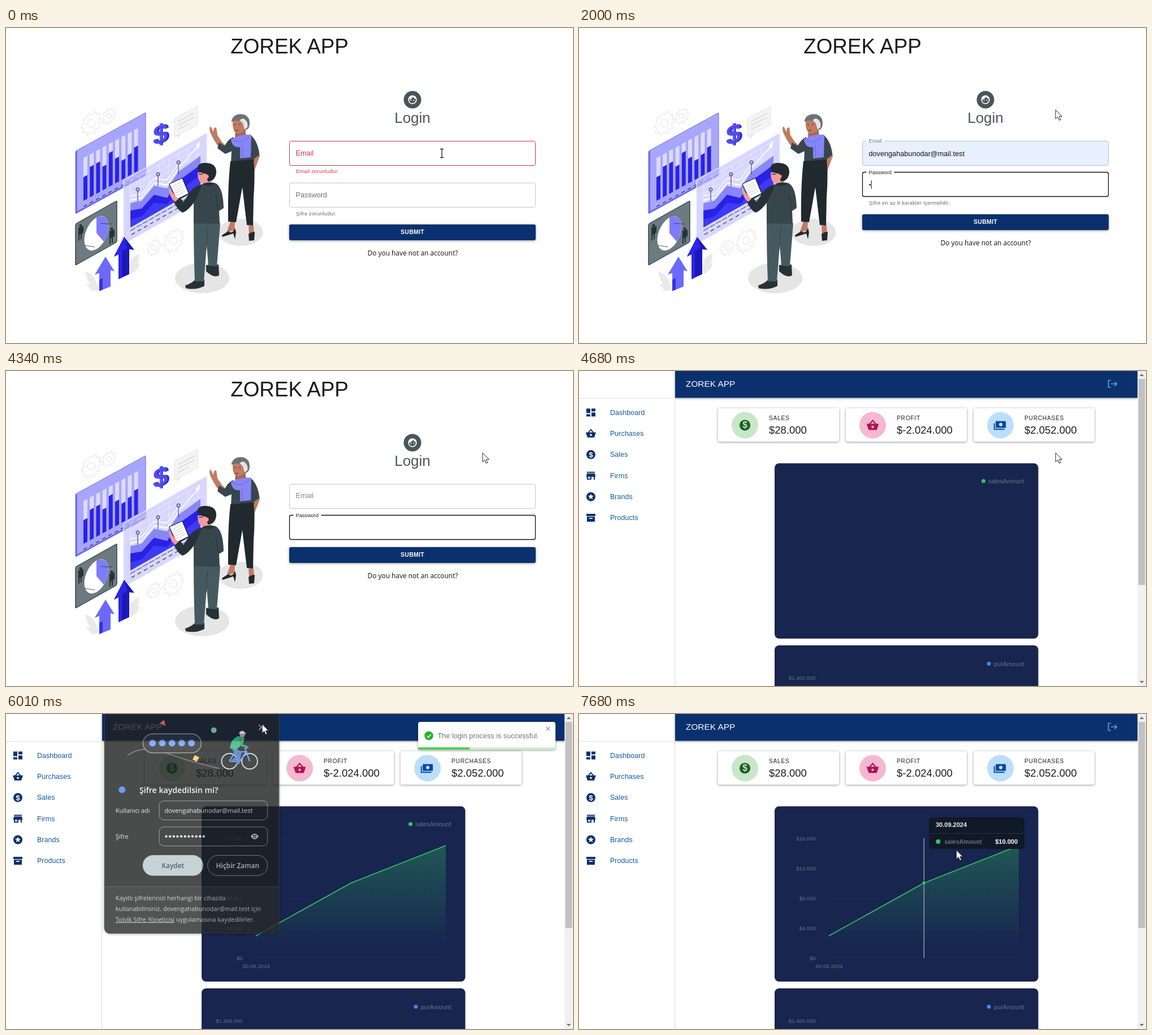
An HTML page that plays this animation: 1003x558 px, repeating every 8000 ms.

```html
<!DOCTYPE html>
<html lang="en">
<head>
<meta charset="utf-8">
<title>Login and dashboard</title>
<style>
html, body { margin: 0; width: 100%; height: 100%; overflow: hidden; background: #fff; }
svg { display: block; width: 100vw; height: 100vh; font-family: "Liberation Sans", Arial, sans-serif; }
.ui { font-family: "Open Sans", "Noto Sans", sans-serif; }
.b { font-weight: bold; }
.s { font-weight: 600; }
.sh { filter: drop-shadow(0 1px 2px #0006); }
</style>
</head>
<body>
<svg id="stage" viewBox="0 0 1003 558"></svg>
<script>
const LOOP = 8000;
const STEPS = [0, 330, 670, 1000, 1340, 1670, 2000, 2340, 2670, 3010, 3340, 4010, 4340, 4680,
  5010, 5340, 5680, 6010, 6350, 6680, 7010, 7350, 7680];
const APP = 'ZOREK APP', MAIL = 'dovengahabunodar@mail.test';
const NAVY = '#0a316e', GREEN = '#34c463', GREY = '#6b7280';

const text = (x, y, str, size, fill, attrs = '') =>
  `<text x="${x}" y="${y}" font-size="${size}" fill="${fill}" ${attrs}>${str}</text>`;
const rect = (x, y, w, h, fill, attrs = '') =>
  `<rect x="${x}" y="${y}" width="${w}" height="${h}" fill="${fill}" ${attrs}/>`;
const ellipse = (x, y, rx, ry, fill, attrs = '') =>
  `<ellipse cx="${x}" cy="${y}" rx="${rx}" ry="${ry}" fill="${fill}" ${attrs}/>`;
const circle = (x, y, r, fill, attrs) => ellipse(x, y, r, r, fill, attrs);
const path = (d, fill, attrs = '') => `<path d="${d}" fill="${fill}" ${attrs}/>`;
const line = (d, stroke, width = 1, attrs = '') =>
  path(d, 'none', `stroke="${stroke}" stroke-width="${width}" ${attrs}`);
const group = (attrs, ...parts) => `<g ${attrs}>${parts.join('')}</g>`;
const times = (n, f) => Array.from({ length: n }, (_, i) => f(i)).join('');
const END = 'text-anchor="end"', MID = 'text-anchor="middle"';

// ---------- illustration ----------
function gear(x, y, r) {
  const pts = times(40, i => {
    const a = i / 40 * 2 * Math.PI, q = i % 4 < 2 ? r : r * .78;
    return `${(x + q * Math.cos(a)).toFixed(1)},${(y + q * Math.sin(a) * 1.1 - q * Math.cos(a) * .4).toFixed(1)} `;
  });
  return `<polygon points="${pts}" fill="#fff" stroke="#dedede"/>` + circle(x, y, r * .38, '#fff', 'stroke="#dedede"');
}

function barPanel() {
  const dark = [42, 54, 54, 42, 60, 44, 34, 38, 45];
  return group('transform="matrix(1 -.55 0 1 123 218)"',
    rect(0, 0, 124, 111, '#a8a6fc', 'rx="2" stroke="#6f6bf3"'),
    line('M1.5 1V109.5H123', '#6763f2', 2.5),
    dark.map((h, i) => rect(14 + 11.2 * i, 20, 7, 76, '#dcdbfe') + rect(14 + 11.2 * i, 96 - h, 7, h, '#2a22e8')).join(''),
    line('M14 106H114', '#30355f', 1.5, 'stroke-dasharray="6 5"'));
}

function piePanel() {
  return group('transform="matrix(1 -.56 0 1 123 347)"',
    rect(0, 0, 73, 73, '#6b7b80', 'rx="2" stroke="#37474f" stroke-width="1.5"'),
    ellipse(37, 37.5, 21.5, 28, '#fff'),
    path('M37 37V9.5A21.5 28 0 0 1 50 59.5Z', '#7f7cfa'),
    line('M44 24L64 36M34 60L16 47', '#263238', .7)) +
    [[132, 360], [187, 366]].map(([x, y]) => circle(x, y - 10, 2.5, '#263238') +
      path(`M${x - 5} ${y - 6}l10-3v12l-3 1v10l-2 1v-9l-2 1v9l-2 1v-21z`, '#263238')).join('');
}

function chartPanel() {
  return group('transform="matrix(1 -.57 0 1 208 270)"',
    rect(0, 0, 147, 113, '#bdbbff', 'rx="2" fill-opacity=".6" stroke="#e9e8ff" stroke-width="1.5"'),
    times(8, i => line(`M${12 + 17 * i} 8V94M12 ${8 + 11 * i}H136`, '#fff', .7, 'opacity=".6"')),
    path('M12 47L32 54 54 40 77 58 97 40 136 34V90H12Z', '#8986fa'),
    path('M12 60L32 68 54 56 77 75 97 56 136 50V90H12Z', '#2822e6'),
    path('M12 76L32 82 54 70 77 86 97 74 136 68V90H12Z', '#3f3af5'),
    line('M12 42L32 49 54 35 77 52 97 34 131 15', '#fff', 2),
    line('M12 34L32 42 54 27 77 43 97 26', '#fff', 1.5),
    path('M136 8L133 18 127 12Z', '#fff'),
    line('M12 96H112', '#25294a', 1, 'stroke-dasharray="9 2"'),
    line('M14 104H102', '#25294a', 1.3, 'stroke-dasharray="6 5"')) +
    [[233, 286], [269, 259], [305, 238]].map(([x, y]) =>
      line(`M${x} ${y + 3}V${y + 21}`, '#252a5a') + circle(x, y, 3, '#b9b7ff', 'stroke="#252a5a"')).join('');
}

function woman() {
  const skin = '#c07b62';
  return [
    path('M386 222Q372 208 362 187Q358 177 362 174L367 184 368 177 372 176 374 190 382 202 394 213Z', skin),
    path('M402 193Q392 198 387 209L377 203 374 213 388 223 402 217Z', '#37474f'),
    path('M436 192Q447 206 449 227L440 251 438 267 430 271 425 262 431 250 436 226Z', skin),
    path('M434 191Q446 202 448 225L437 233Z', '#37474f'),
    path('M400 196L435 191 439 235 398 238Z', '#37474f'),
    path('M397 343H405L404 358 390 363Z M429 350H438L439 366H430Z', skin),
    path('M397 236L438 233Q441 262 438 300L437 350 426 349 418 282 407 344 393 343Q392 280 397 236Z', '#20292e'),
    path('M382 367L393 360Q401 366 405 354L407 362 405 374 402 364 383 370Z', '#20292e'),
    path('M429 365L434 362 440 361 439 376 430 377Z', '#20292e'),
    path('M406 178L423 176 425 194 405 196Z', '#a9664f'),
    path('M401 166Q404 157 415 159L423 170Q423 187 410 187Q400 184 401 166Z', skin),
    path('M399 163Q403 152 416 152.5Q431 154 431 169Q431 180 422 181L419 169Q411 161 399 166Z', '#6b7276'),
    path('M419 160Q429 164 427 176L422 180 419 169 413 163Z', '#e5e5e5'),
    line('M404 171h3M412 171h3M405 181q3 2 6 0', '#4a2a22'),
    path('M398 197Q414 187 434 189L433 229 414 231V211Q400 213 398 197Z', '#8785f8'),
    line('M401 198Q416 207 430 193M418 208V229', '#6a67e0')
  ].join('');
}

function man() {
  const pink = '#f39b9b';
  return [
    path('M354 420L376 419 377 438Q368 444 354 431Z', '#263238'),
    path('M317 456Q330 452 336 444L351 446V457Q336 465 318 461Z', '#263238'),
    path('M332 345L379 346 373 422 358 421 355 385 350 449 334 449Q332 400 332 345Z', '#455a60'),
    line('M357 352L354 392', '#34454b'),
    path('M339 256Q339 275 350 276L352 284 364 280 362 255Z', pink),
    path('M338 249Q340 238 352 239Q372 239 372 255Q371 271 357 272L354 258Q343 258 338 249Z', '#222b2f'),
    line('M341 259h7', '#222b2f', 1.3),
    circle(355, 263, 3.5, pink),
    path('M331 286Q346 273 371 275Q384 282 385 319L377 324 378 347 332 346V308Z', '#37464c'),
    path('M347 277Q332 280 324 293L314 308 308 301 297 308Q303 322 312 327Q321 325 333 308L340 294Z', '#263238'),
    path('M347 277Q358 284 371 275Q360 272 350 275Z', '#263238'),
    line('M371 293L375 322', '#263238'),
    path('M288 276L312 265 325 294 302 306Z', '#222b2f'),
    path('M289.5 276.5L311.5 266.5 322.5 293 302 303Z', '#fff'),
    times(5, i => line(`M${294 + i * 1.7} ${281 + i * 4}l16-8`, '#bbb', .8)),
    path('M288 282L299 297 305 303 299 308Q288 299 288 282Z', pink)
  ].join('');
}

const illustration = () => [
  ellipse(347, 443, 48, 27, '#e5e5e5'), ellipse(415, 362, 39.5, 24, '#e5e5e5'),
  gear(151, 169, 18), gear(182, 156, 12), gear(296, 377, 18), gear(262, 389, 12),
  group('transform="matrix(1 -.52 0 1 298 160)"',
    rect(0, 0, 41, 33, '#f4f4f4', 'rx="2" stroke="#e2e2e2"'), line('M6 9H35M6 16H35M6 23H25', '#d6d6d6', 1.5)),
  path('M301 190l3 6 6-9z', '#e8e8e8'),
  barPanel(),
  group('class="b" transform="matrix(1 -.35 0 1 274 188)"',
    text(2, 17, '$', 48, '#2925c4', MID), text(-1, 16, '$', 48, '#504cf6', MID)),
  chartPanel(), piePanel(),
  path('M140 432q14 2 20 18l4 14q-18-4-24-32zM142 454q14-2 22 10l-12 2zM236 401q-14 2-18 20l2 16q14-10 16-36zM237 416q-10 4-17 16l0 4q14-6 17-20z', '#e9e9e9'),
  path('M209 370L191 405 199 401V445L218 436V392L227 393Z', '#1c18b8'),
  path('M209 370L191 405 199 401V445L205 442V396L215 390Z', '#2a25ea'),
  path('M176 405L157 437 165 434V466L185 458V429L192 431Z', '#6c69fa'),
  path('M165 446V466L171 463V443Z', '#3530e8'),
  woman(), man()
].join('');

// ---------- login page ----------
const field = (y, id) => rect(501.5, y + .5, 435, 43, '#fff', `rx="3" stroke="#c4c4c4" id="${id}"`);
const label = (x, y, w, str, id) =>
  group(`id="${id}"`, rect(x - 4, y - 5, w + 8, 4, '#fff'), text(x, y, str, 9.2, '#666'));
const helper = (y, str, fill, id) => text(513, y, str, 9.15, fill, `letter-spacing=".3" id="${id}"`);

function login() {
  return group('id="login"',
    text(501.5, 45, APP, 36.8, '#1b1b1b', MID),
    illustration(),
    circle(719, 127, 15.5, '#4a555b'), circle(719, 127, 7.7, '#fff'),
    path('M713 127Q718 126 720 122 722 125 725 126Q725 133 719 133 713 133 713 127Z', '#4a555b'),
    circle(716.5, 128, 1.1, '#fff'), circle(721.5, 128, 1.1, '#fff'),
    text(719, 168, 'Login', 26, '#4c565c', MID),
    field(200, 'mailBox'),
    text(512.5, 226, 'Email', 12.6, '#d32f55', 'id="mailHint"'),
    label(512.5, 203, 24, 'Email', 'mailLabel'),
    text(512.5, 227, MAIL, 12.7, '#111', 'id="mailText"'),
    helper(257, 'Email zorunludur.', '#d32f3f', 'mailError'),
    group('id="passGroup"',
      field(255, 'passBox'),
      text(512.5, 281, 'Password', 12.6, '#6d6d6d', 'id="passHint"'),
      label(512.5, 258.5, 41, 'Password', 'passLabel'),
      '<g id="passDots"></g>',
      rect(0, 270, 1, 15, '#111', 'id="caret"'),
      helper(313, '', '#666', 'passError')),
    group('id="submit"',
      rect(501, 348, 436, 28, NAVY, 'rx="3" class="sh"'),
      text(719, 364.5, 'SUBMIT', 10.5, '#fff', `class="b" letter-spacing=".3" ${MID}`),
      text(719.5, 403, 'Do you have not an account?', 11.9, '#111', `class="ui" ${MID}`)),
    group('id="suggest" class="ui s"',
      path('M610 254L618 245 626 254Z', '#1d1e1f'),
      rect(598, 253, 230, 217, '#1d1e1f', 'rx="6" class="sh"'),
      group('id="hover"', rect(602, 257, 222, 35, '#3a3b3c', 'rx="4"'), line('M802.5 270l8 8m0-8l-8 8', '#ccc', 1.3)),
      [MAIL, 'manager@q.test', 'manager@mail.test', 'velton', 'ed@mail.test', 'dovengahabunodar@relay.t...']
        .map((s, i) => text(609.5, 279 + 35 * i, s, 11.9, '#e8e8e8')).join('')));
}

// ---------- dashboard ----------
const coin = bg => circle(0, 0, 8, 'currentColor') + text(0, 4.5, '$', 13, bg, `class="b" ${MID}`);
const basket = bg => line('M-5-1L0-7 5-1', 'currentColor', 1.8) + path('M-9-2H9L6 7H-6Z', 'currentColor') + circle(0, 2.5, 1.8, bg);
const cash = bg => rect(-7, -6, 15, 10, 'currentColor', 'rx="1"') + circle(.5, -1, 2.6, bg) + line('M-9-3V6H6', 'currentColor', 1.6);
const star = () => times(5, i => path('M-2 0L0-5.5 2 0Z', '#fff', `transform="rotate(${72 * i})"`));
const icon = (x, y, scale, color, body) =>
  group(`transform="translate(${x} ${y}) scale(${scale})" style="color:${color}"`, body);

function sidebar() {
  const items = [
    ['Dashboard', path('M-8-7h7v8h-7zM1-7h7v5h-7zM-8 3h7v4h-7zM1 0h7v7h-7z', 'currentColor')],
    ['Purchases', basket('#fff')],
    ['Sales', coin('#fff')],
    ['Firms', path('M-7-7H7v2H-7zM-7-4H7l1 4v2H7v5H5V2H1v5H-7V2h-1V0zM-5 2v3h4V2z', 'currentColor', 'fill-rule="evenodd"')],
    ['Brands', circle(0, 0, 8, 'currentColor') + star()],
    ['Products', path('M-8-7H8v4H-8zM-7-2H7V7H-7z', 'currentColor') + rect(-3, 0, 6, 1.7, '#fff')]
  ];
  return line('M169.5 0V558M0 48.5H169', '#dcdcdc') + items.map(([name, body], i) => {
    const y = 73.5 + 37.3 * i;
    return icon(21, y, 1, NAVY, body) + text(55, y + 4.2, name, 12.4, '#12599c', 'letter-spacing=".1"');
  }).join('');
}

const card = (x, name, value, bg, color, body) =>
  rect(x, 66, 214, 59, '#fff', 'rx="3" class="sh"') + circle(x + 47.5, 96, 23.5, bg) + icon(x + 47.5, 96, 1.2, color, body(bg)) +
  text(x + 90, 87, name, 10.2, '#222', 'letter-spacing=".75"') + text(x + 90, 110.5, value, 18.5, '#1c1c1c');

const panel = y => rect(346, y, 466.5, 310.5, '#17254f', 'rx="8"');
const legend = (x, y, color, str) => circle(x, y, 3.5, color) + text(787.5, y + 4, str, 11, GREY, END);

function charts() {
  return panel(163.5) + panel(486) +
    group('id="series"',
      times(5, i => line(`M442 ${220.5 + 53 * i}H778`, '#1a2a56') +
        text(418.5, 223.5 + 53 * i, ['$16.000', '$12.000', '$8.000', '$4.000', '$0'][i], 9.5, GREY, END)),
      path('M442 393L610 299.5 778 233V432H442Z', 'url(#fade)'),
      line('M442 393L610 299.5 778 233', GREEN, 1.6),
      text(442.5, 450, '30.09.2024', 9.7, GREY, MID)) +
    legend(715.5, 195, GREEN, 'salesAmount') + legend(725, 518.5, '#4484f4', 'purAmount') +
    text(418.5, 547, '$1.400.000', 9.5, GREY, END) +
    group('id="tip"',
      line('M610.3 220V432', '#98a2b5', 1.4), circle(610.3, 299.5, 3.7, GREEN, 'stroke="#17254f"'),
      rect(619, 183, 169, 56, '#111827', 'rx="5"'), line('M619 211.5H788', '#273142'),
      text(631, 200, '30.09.2024', 11, '#eee', 'class="b"'), circle(635.3, 226, 4, GREEN),
      text(646.5, 229.7, 'salesAmount', 10.5, GREY, 'class="b"'),
      text(776, 229.7, '$10.000', 11, '#fff', `class="b" ${END}`));
}

const toast = () => group('id="toast"',
  rect(729, 14, 243, 49, '#fff', 'rx="4" class="sh"'),
  circle(748, 38.5, 7.8, '#21b524'), line('M744.5 38.5l2.7 2.8 4.6-5', '#fff', 1.6),
  text(763.5, 43, 'The login process is successful.', 12.7, '#757575'),
  line('M955.5 22.5l7 7m0-7l-7 7', '#999', 1.3),
  rect(729, 59, 243, 4, '#cfeecf'), rect(729, 59, 0, 4, '#51cf54', 'id="bar"'));

const cyclist = () => [
  [396, 432].map(x => circle(x, 83, 14, 'none', 'stroke="#d9dfe3" stroke-width="1.8"')).join(''),
  line('M396 83L406 66 426 66 414 84 396 83M406 66L414 84M432 83L424 60 430 58', '#5c95f5', 2.2),
  line('M402 62L415 67 411 88M404 62L411 75 402 82', '#4777cc', 5, 'stroke-linejoin="round"'),
  path('M397 60Q398 43 412 38L423 42 420 51 408 63Z', '#36b37a'),
  line('M415 43L419 55 428 57', '#2b9966', 4),
  circle(419, 36, 4.5, '#d8957c'), path('M413 34Q414 28 421 29L426 34Z', '#e8eaed')
].join('');

function savePopup() {
  const soft = '#c9cccd', edge = 'stroke="#8b9092"';
  return group('id="popup" class="ui"',
    rect(172.5, -12, 312, 403, '#1e2020', 'rx="10" stroke="#454848" class="sh"'),
    path('M173 307H484V381Q484 391 474 391H183Q173 391 173 381Z', '#282a2a'), line('M173 307.5H484', '#4a4d4d'),
    line('M214 72Q244 53 280 67T378 96', '#606467', 2),
    rect(241.5, 34, 104, 34, '#2a2d2e', `rx="17" ${edge} stroke-width="1.5"`),
    times(5, i => circle(258.5 + 17.4 * i, 50.5, 6, '#6e9ff6')),
    path('M271 15L279 9 282 20Z', '#e8645c'), circle(368, 27.5, 5, '#7fcf95'),
    rect(-4.5, -4.5, 9, 9, '#f7d060', 'rx="1" transform="translate(336 78) rotate(30)"'),
    cyclist(),
    line('M448.5 18l9 9m0-9l-9 9', '#ccc', 1.4),
    circle(204, 134, 6, '#4285f4'),
    text(235, 140, 'Şifre kaydedilsin mi?', 14.3, '#f1f1f1', 'class="s"'),
    text(192.5, 175, 'Kullanıcı adı', 11, '#e5e5e5'), text(192.5, 221.5, 'Şifre', 11, '#e5e5e5'),
    rect(270.5, 154, 193.5, 34, 'none', `rx="8" ${edge}`), rect(270.5, 200.5, 193.5, 34, 'none', `rx="8" ${edge}`),
    text(280, 175, MAIL, 11.2, '#eee'),
    times(11, i => circle(283 + 6.7 * i, 217.5, 2.2, '#e5e5e5')),
    path('M434 217.5Q441 207.5 448 217.5Q441 227.5 434 217.5Z', '#cfd3d5'), circle(441, 217.5, 3, '#1e2020'), circle(441, 217.5, 1.7, '#cfd3d5'),
    rect(241, 251, 108, 37, '#b7c9cc', 'rx="18.5"'), rect(357, 251.5, 107, 36, 'none', `rx="18" ${edge}`),
    text(295, 274, 'Kaydet', 12, '#2d3b40', `class="s" ${MID}`), text(410.5, 274, 'Hiçbir Zaman', 12, '#c3d3d6', `class="s" ${MID}`),
    text(192.5, 332, 'Kayıtlı şifrelerinizi herhangi bir cihazda', 11, soft),
    text(192.5, 351, `kullanabilirsiniz. ${MAIL} için`, 11, soft),
    text(192.5, 370, '<tspan text-decoration="underline">Tolvik Şifre Yöneticisi</tspan> uygulamasına kaydedilirler.', 11, soft));
}

const dashboard = () => group('id="dash"',
  rect(170, 0, 818, 47.5, NAVY, 'class="sh"'),
  sidebar(),
  text(189, 28, APP, 15.4, '#fff'),
  line('M941 16.5H936.5V29H941M941 22.8H951M947.5 19L951.3 22.8 947.5 26.6', '#59acd8', 1.6),
  card(246, 'SALES', '$28.000', '#c8e6c9', '#1b5e20', coin),
  card(472, 'PROFIT', '$-2.024.000', '#f5b8d0', '#ad1457', basket),
  card(698, 'PURCHASES', '$2.052.000', '#bbdefb', '#0d47a1', cash),
  charts(),
  rect(988, 0, 15, 558, '#f1f1f1'), rect(989.5, 14, 12, 365, '#c1c1c1'),
  path('M991.5 9L995.5 5 999.5 9ZM991.5 549H999.5L995.5 553Z', '#707070'),
  toast(), savePopup());

const stage = document.getElementById('stage');
stage.innerHTML = `<defs><linearGradient id="fade" gradientUnits="userSpaceOnUse" x1="0" y1="233" x2="0" y2="412">
  <stop stop-color="${GREEN}" stop-opacity=".32"/><stop offset="1" stop-color="${GREEN}" stop-opacity="0"/></linearGradient></defs>` +
  login() + dashboard() +
  group('id="arrow"', path('M0 0V16L3.8 12.6 6.4 18.5 9 17.3 6.5 11.7H11.5Z', '#fff', 'stroke="#222"')) +
  group('id="beam"', line('M768 214.5H770.5L771 215 771.5 214.5H774M771 215V229M768 229.5H774', '#222', 1.3));

// ---------- timeline ----------
const el = id => document.getElementById(id);
const show = (id, on) => el(id).setAttribute('display', on ? 'inline' : 'none');
const set = (id, attrs) => Object.entries(attrs).forEach(([k, v]) => el(id).setAttribute(k, v));
const keyed = (keys, t) => keys.findLast(k => k[0] <= t).slice(1);

const CURSOR = [[0, 738, 267], [1670, 843, 145], [6010, 453, 18], [6350, 949, 22], [6680, 851, 50],
  [7010, 797, 33], [7350, 732, 250], [7680, 667.5, 241]];
const TYPED = [[0, 0], [2000, 1], [2340, 2], [2670, 4], [3010, 6], [3340, 8], [4010, 11], [4340, 0]];
const PASS_ERROR = [[0, 'Şifre zorunludur.'], [2000, 'Şifre en az 8 karakter içermelidir.'],
  [3340, 'Şifre en az bir özel karakter (@$!%*?&) içermelidir.'], [4010, '']];

function drawLogin(t) {
  const error = t < 1000, filled = t >= 670 && t < 4340, floating = t >= 330 && t < 4340, focused = t >= 1340;
  const color = error ? '#d32f3f' : t < 1340 ? '#222' : t < 4340 ? '#aebccf' : '#c4c4c4';
  set('mailBox', { stroke: color, fill: filled ? '#e8f0fe' : '#fff' });
  show('mailHint', !floating);
  set('mailHint', { fill: error ? '#d32f55' : '#858585', y: error ? 226 : 225 });
  show('mailLabel', floating);
  el('mailLabel').lastChild.setAttribute('fill', error ? '#d32f3f' : '#6b7686');
  show('mailText', filled);
  set('mailText', { 'font-size': error ? 10.6 : 12.7 });
  show('mailError', error);
  set('passGroup', { transform: `translate(0 ${error ? 19 : 0})` });
  set('passBox', { stroke: focused ? '#111' : '#c4c4c4', 'stroke-width': focused ? 1.3 : 1 });
  show('passHint', !focused);
  show('passLabel', focused);
  el('passLabel').lastChild.setAttribute('fill', '#222');
  const [typed] = keyed(TYPED, t);
  el('passDots').innerHTML = times(typed, i => circle(514.7 + 4.25 * i, 278, 1.4, '#111'));
  show('caret', focused && t < 4010);
  set('caret', { x: 512.5 + 4.25 * typed });
  el('passError').textContent = keyed(PASS_ERROR, t)[0];
  set('submit', { transform: `translate(0 ${error ? 0 : t < 4010 ? -18 : -36})` });
  show('suggest', t >= 330 && error);
  show('hover', t >= 670 && error);
}

function drawDashboard(t) {
  show('series', t >= 5010);
  show('tip', t >= 7680);
  show('toast', t >= 5010 && t < 7680);
  // The countdown pauses while the pointer rests on the toast.
  const run = Math.min(t, 6250) - 5010 + Math.max(0, t - 7050);
  set('bar', { width: Math.max(0, 236 - .145 * run) });
  show('popup', t >= 5010 && t < 6350);
  const closing = t >= 6010;
  set('popup', { opacity: closing ? .8 : 1, transform: closing ? 'translate(3.3 1.5) scale(.99)' : '' });
}

function frame(now) {
  const t = STEPS.findLast(s => s <= now % LOOP);
  const inside = t >= 4680;
  show('login', !inside);
  show('dash', inside);
  (inside ? drawDashboard : drawLogin)(t);
  const [x, y] = keyed(CURSOR, t);
  show('beam', t < 670);
  show('arrow', t >= 670);
  set('arrow', { transform: `translate(${x} ${y})` });
  requestAnimationFrame(() => frame(performance.now()));
}
frame(0);
</script>
</body>
</html>
```
